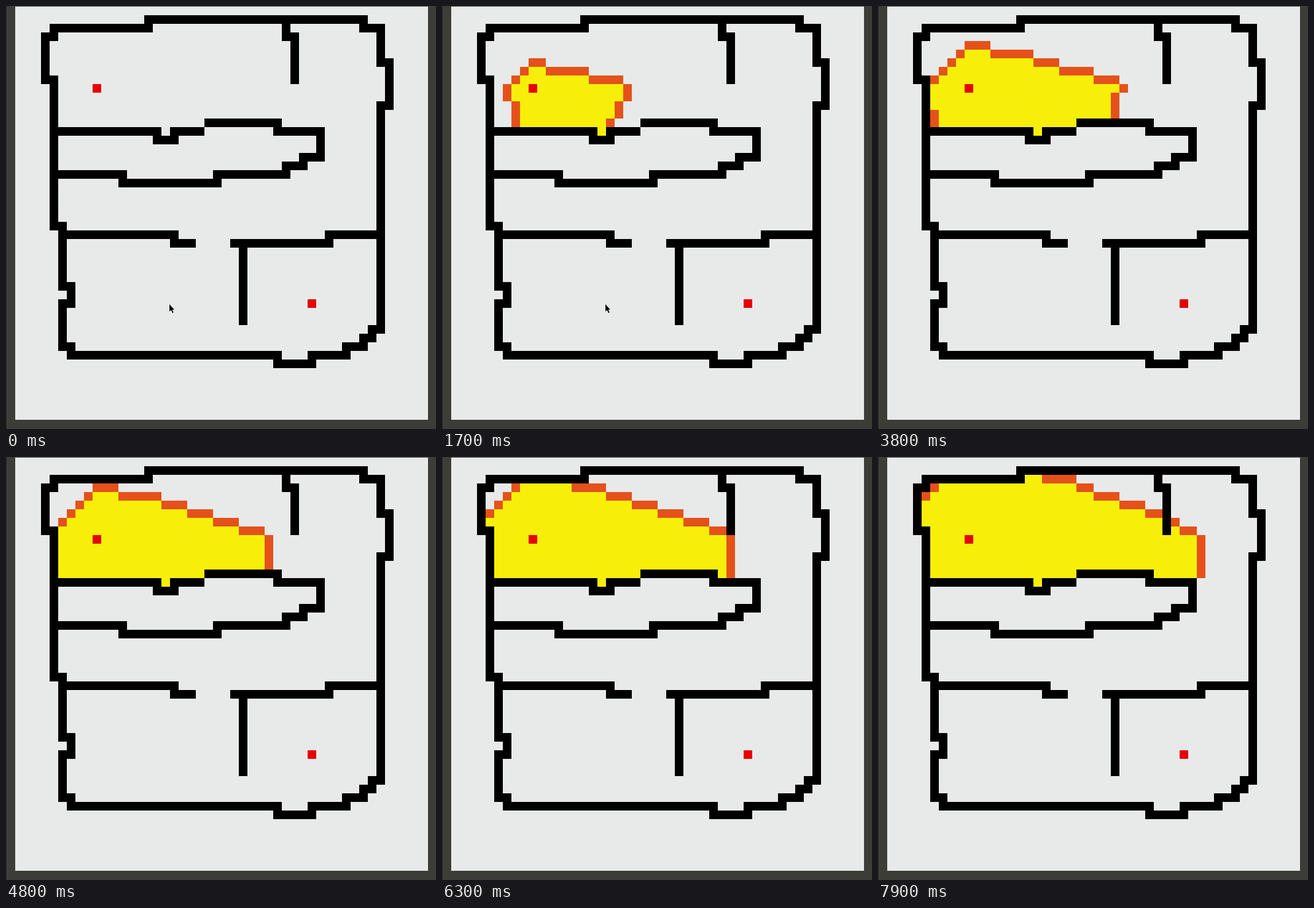
An HTML page with a canvas that plays this animation: 700 by 688 pixels, repeating every 8000 ms.

```html
<!DOCTYPE html>
<html lang="en">
<head>
<meta charset="utf-8">
<title>A* search</title>
<style>
  html, body { margin: 0; width: 100%; height: 100%; overflow: hidden; background: #3d3d37; }
  canvas { display: block; }
</style>
</head>
<body>
<canvas id="stage" width="700" height="688"></canvas>
<script>
const ctx = document.getElementById('stage').getContext('2d');
const SIZE = 48, CELL = 14, LEFT = 15, TOP = 1;
const LOOP = 8000, TICK = 100, SEARCH_START = 200, POINTER_GONE = 3400;
const start = { x: 9, y: 9 }, goal = { x: 34, y: 34 };

// One-cell-wide strokes; whole numbers are cell centres.
const outline = 'M15 1H40V2H42V6H43V11H42V37H41V38H40V39H38V40H34V41H30V40H6V39H5V34H6V32H5V25H4V8H3V3H4V2H15Z';
const topPartition = 'M31 2V3H32V8';
const alcove = 'M4 14H16V15H18V14H21 M22 13H30V14H35V17H33V18H31V19H23V20H12V19H4';
const lowerRooms = 'M5 26H18V27H20 M25 27H36V26H42 M26 27V36';
const walls = new Path2D([outline, topPartition, alcove, lowerRooms].join(' '));
const pointer = new Path2D('M266 485V497L268.7 494.6L271 499.5L272.8 498.6L270.6 494H274Z');

ctx.lineCap = 'square';
ctx.lineWidth = 1;

// The expansion rate sags as the frontier grows, then recovers slightly.
function expandedAt(time) {
  const seconds = Math.max(0, time - SEARCH_START) / 1000;
  return Math.round(seconds * (37.07 + 0.36 * (seconds - 6.5) ** 2));
}

// A* with four neighbours and straight-line distance; notes when each cell opens and closes.
function search(limit) {
  const seen = new Map(), open = [];
  const visit = (x, y, steps, openedAt) => {
    const id = y * SIZE + x;
    if (seen.has(id) || ctx.isPointInStroke(walls, x, y)) return;
    const cost = steps + Math.hypot(goal.x - x, goal.y - y);
    const node = { x, y, steps, cost, openedAt, closedAt: Infinity };
    seen.set(id, node);
    open.push(node);
  };
  visit(start.x, start.y, 0, 0);
  for (let count = 1; count <= limit; count++) {
    open.sort((a, b) => a.cost - b.cost);
    const node = open.shift();
    node.closedAt = count;
    for (const [dx, dy] of [[1, 0], [0, 1], [-1, 0], [0, -1]]) {
      visit(node.x + dx, node.y + dy, node.steps + 1, count);
    }
  }
  return [...seen.values()];
}

const nodes = search(expandedAt(LOOP));

function fillCell({ x, y }, color) {
  ctx.fillStyle = color;
  ctx.fillRect(x - 0.5, y - 0.5, 1, 1);
}

function drawGrid(count) {
  ctx.save();
  ctx.setTransform(CELL, 0, 0, CELL, LEFT + CELL / 2, TOP + CELL / 2);
  ctx.strokeStyle = '#000';
  ctx.stroke(walls);
  for (const node of nodes) {
    if (node.closedAt <= count) fillCell(node, '#f7ef0a');
    else if (node.openedAt <= count) fillCell(node, '#e5511b');
  }
  fillCell(start, '#e60000');
  fillCell(goal, '#e60000');
  ctx.restore();
}

function draw(time) {
  ctx.fillStyle = '#3d3d37';
  ctx.fillRect(0, 0, 700, 688);
  ctx.fillStyle = '#25272a';
  ctx.fillRect(0, 0, 1, 688);
  ctx.fillStyle = '#e8eae9';
  ctx.fillRect(LEFT, TOP, SIZE * CELL, SIZE * CELL);

  drawGrid(expandedAt(time));

  if (time < POINTER_GONE) {
    ctx.strokeStyle = '#fff';
    ctx.stroke(pointer);
    ctx.fillStyle = '#000';
    ctx.fill(pointer);
  }
}

function frame() {
  const time = performance.now() % LOOP;
  draw(Math.floor(time / TICK) * TICK);
  requestAnimationFrame(frame);
}
frame();
</script>
</body>
</html>
```
